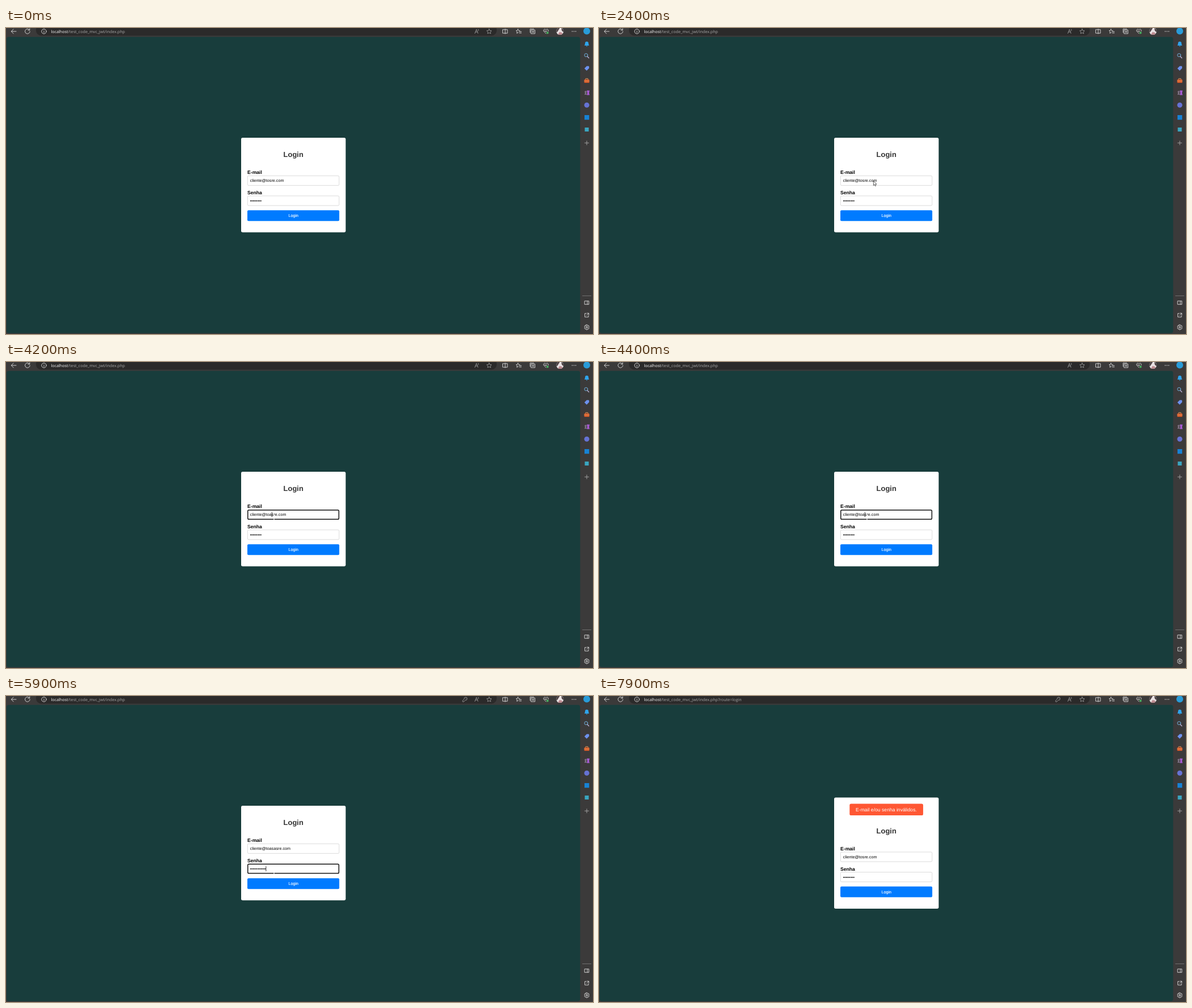
Animation, 1036 px wide and 541 px high, one loop 8000 ms. Source, as an HTML page:

```html
<!DOCTYPE html>
<html lang="pt-BR">
<head>
<meta charset="utf-8">
<title>Login</title>
<style>
  html, body { margin: 0; width: 100%; height: 100%; overflow: hidden; background: #3b3a3a; }
  svg { display: block; width: 100%; height: 100%; }
  text { text-rendering: geometricPrecision; white-space: pre; }
  .ui { font-family: "Open Sans", "Noto Sans", sans-serif; }
  .form { font-family: "Liberation Sans", Arial, sans-serif; font-size: 7.2px; }
  .label { font-size: 8.63px; font-weight: bold; }
  .line { fill: none; stroke: #dedede; stroke-width: .9; stroke-linecap: round; stroke-linejoin: round; }
  .dim { stroke: #999; }
  .field { fill: #fff; }
</style>
</head>
<body>
<svg viewBox="0 0 1036 541" preserveAspectRatio="none">
  <defs>
    <filter id="shadow" x="-10%" y="-10%" width="120%" height="120%">
      <feDropShadow dx="0" dy="0" stdDeviation="2" flood-opacity=".08"/>
    </filter>
    <clipPath id="face"><circle cx="977.7" cy="5.6" r="6.5"/></clipPath>
  </defs>
  <rect width="1036" height="541" fill="#3b3a3a"/>
  <rect x="1" y="15.8" width="1012.3" height="523.7" rx="4" fill="#183d3c"/>

  <!-- address bar -->
  <rect x="53" y="-6" width="813" height="19.5" rx="9" fill="#2b2a2a"/>
  <g class="line">
    <path d="M18 6H9.5M13.2 2L9.3 6L13.2 10"/>
    <path d="M41.4 3.4A4.3 4.3 0 1 0 42.2 6M41.8 1V3.9H38.9"/>
    <circle cx="67" cy="6" r="4.2"/><path d="M67 5.6V8.2M67 3.8V3.9"/>
  </g>
  <text class="ui" x="79.4" y="8.7" font-size="7.18" fill="#fff">localhost<tspan id="path" fill="#a9a9a9"></tspan></text>
  <g class="line dim">
    <path id="key" d="M806 9.8V8L808.7 5.3A2.6 2.6 0 1 1 810.6 7.3L808.4 9.8ZM811.3 4.3V4.4"/>
    <path d="M827.5 9.5L830.3 2.4L833 9.5M828.5 7H832M833.5 2.2Q835 3.5 833.5 5"/>
    <path d="M852.7 1.7L854 4.5L857 4.9L854.8 7L855.4 10L852.7 8.5L850 10L850.6 7L848.4 4.9L851.4 4.5Z"/>
  </g>
  <g class="line">
    <path d="M877 2.8H885V9.2H877ZM881 1.8V10.2"/>
    <path d="M903.5 2L904.6 4.4L907 4.8M903.5 2L902.4 4.4L900.4 4.7L902 6.5L901.6 9.3L904 8M905.5 6.4H909.5M906 8.8H909.5"/>
    <path d="M927 3.5H933.5V10H927ZM925 8V1.8H931.5M930.2 5V8.5M928.5 6.7H932"/>
    <path d="M953 9.8L949.2 6C947.5 3.2 951 .5 953 3.4C955 .5 958.5 3.2 956.8 6M950.5 5.3H952L953 7L954 4.8"/>
    <path d="M999.3 6H999.4M1002.4 6H1002.5M1005.5 6H1005.6" stroke-width="1.5"/>
  </g>
  <circle cx="955.7" cy="8.6" r="2" fill="#4aaf61"/>
  <g clip-path="url(#face)">
    <rect x="971" y="-1" width="14" height="14" fill="#e9e2e3"/>
    <path d="M971 -1H978L973 7L971 8ZM980 0L985 3V8L981 5Z" fill="#4d4345"/>
    <path d="M973 13L977 7L981 8L984 13Z" fill="#bd8c91"/>
  </g>
  <circle cx="1025" cy="5.5" r="6" fill="#299bd8"/>

  <!-- sidebar -->
  <path d="M1020.8 31Q1022 29.5 1022 27A3 3 0 0 1 1028 27Q1028 29.5 1029.2 31ZM1023.5 31.6H1026.5L1025 33Z" fill="#2fa4ec"/>
  <g class="line"><circle cx="1023.8" cy="48" r="2.9" style="stroke:#75bdec"/><path d="M1026 50.3L1028.6 53" style="stroke:#b9b0d5;stroke-width:1.4"/></g>
  <path d="M1020.8 71.5L1025 67.2L1029 67.5L1029.2 71L1024.8 75.5Z" fill="#6d91ee"/>
  <path d="M1020.6 91H1029.4V97H1020.6Z" fill="#d45a2b"/>
  <path d="M1023 91V89.4H1027V91M1020.6 93.8H1029.4" class="line" style="stroke:#f19a58"/>
  <path d="M1021 118H1025L1024 114.5A1.8 1.8 0 1 0 1022 114.5Z" fill="#7c7083"/>
  <path d="M1025 118.5H1030L1029 115L1030 110.5H1025L1026 115Z" fill="#a85bd4"/>
  <circle cx="1025" cy="136.2" r="4.5" fill="#6672d4"/>
  <rect x="1021" y="154" width="8.2" height="8.2" fill="#1782d4"/>
  <rect x="1021.5" y="176" width="7" height="7" fill="#3aa5c0"/>
  <g class="line">
    <path d="M1021.5 203.2H1028.5M1025 199.7V206.7" style="stroke:#aaa"/>
    <path d="M1017.5 473.5H1032.5" style="stroke:#777"/>
    <path d="M1021.5 482.7H1028.7V488.7H1021.5ZM1026 482.7V488.7"/>
    <path d="M1024 504.6H1021.6V511H1028V508.5M1025.6 504.2H1028.6V507.2M1028.3 504.5L1024.8 508"/>
    <circle cx="1025" cy="529" r="1.4"/>
    <path d="M1024 524.8H1026L1026.5 526.3L1028 525.8L1029.2 527.7L1028.2 529L1029.2 530.4L1028 532.2L1026.5 531.8L1026 533.3H1024L1023.5 531.8L1022 532.2L1020.8 530.4L1021.8 529L1020.8 527.7L1022 525.8L1023.5 526.3Z"/>
  </g>

  <!-- login card -->
  <rect id="card" x="415" width="184.5" rx="2.7" fill="#fff" filter="url(#shadow)"/>
  <g id="alert" class="form">
    <rect x="442.3" y="190.4" width="129.8" height="20.7" rx="2.7" fill="#ff5733"/>
    <text x="453" y="203.6" font-size="8.63" style="font-size:8.63px" fill="#fff">E-mail e/ou senha inválidos.</text>
  </g>
  <g id="form" class="form">
    <text x="507.2" y="228" text-anchor="middle" style="font-size:12.95px;font-weight:bold" fill="#333">Login</text>
    <text class="label" x="426" y="258.4">E-mail</text>
    <rect id="emailBox" class="field" rx="1.8"/>
    <text id="email" x="430.8" y="272.2"></text>
    <text class="label" x="426" y="294.2">Senha</text>
    <rect id="passBox" class="field" rx="1.8"/>
    <text id="pass" x="430.8" y="308"></text>
    <rect id="button" x="426" y="322.2" width="162.2" height="19" rx="2"/>
    <text x="507.2" y="334.3" text-anchor="middle" fill="#fff" stroke="#fff" stroke-width=".15">Login</text>
    <rect id="caret" width=".8" height="9"/>
  </g>

  <!-- autofill list -->
  <g id="list" class="ui" fill="#fff">
    <rect x="425.7" y="278.8" width="173.8" height="86" rx="4" fill="#4a4a4a" stroke="#646464" stroke-width=".6"/>
    <text x="432.7" y="291" font-size="5.6" fill="#b4b4b4">Digite '/' para pesquisar a partir das suas informações salvas</text>
    <g font-size="6.2" font-weight="700">
      <text x="433" y="310.6">cliente@tosre.com</text>
      <text x="433" y="331">cliente@tosre.com.br</text>
    </g>
    <path d="M426 341.5H599.3" stroke="#6c6c6c" stroke-width=".8"/>
    <g class="line"><circle cx="436" cy="351.3" r="1.9"/><path d="M436.5 357H433.2Q433 354.6 436 354.5"/></g>
    <rect x="436.8" y="353.8" width="3.8" height="3.4" rx=".5"/>
    <text x="447" y="356" font-size="6.07">Gerenciar informações pessoais</text>
  </g>

  <!-- pointers, hot spot at 0,0 -->
  <g id="pointer" stroke="#222" stroke-width=".7" stroke-linejoin="round" fill="#fff">
    <path id="arrow" d="M.4 .4V8.3L2.2 6.7L3.5 9.5L4.8 8.9L3.6 6.2H6Z"/>
    <path id="hand" d="M-.9 .7Q0 -.6 .9 .7V4L3.8 4.7Q5 5.1 4.8 6.5L4 10.8H-.5L-3 7.2Q-3.2 5.8 -.9 7Z"/>
    <path id="beam" d="M0 0V10" stroke="#fff" stroke-width="1.2"/>
  </g>
</svg>
<script>
const LOOP = 8000, STEP = 100;
const $ = id => document.getElementById(id);
const set = (id, attrs) => { for (const k in attrs) $(id).setAttribute(k, attrs[k]); };
const show = (id, on) => set(id, { visibility: on ? 'visible' : 'hidden' });
const passed = (t, times) => times.filter(x => x <= t).length;
const ramp = (t, a, b) => Math.min(1, Math.max(0, (t - a) / (b - a)));

// time, shape, x, y; glides while the shape stays the same
const track = [
  [0], [200, 'arrow', 75, 159], [400, 'arrow', 216, 241], [500, 'arrow', 216, 241], [1300, 'arrow', 514, 346],
  [1400], [1800, 'arrow', 558, 290], [1900, 'arrow', 478, 296],
  [2100], [2300, 'arrow', 484, 282], [2400, 'arrow', 484, 270],
  [2500], [3500, 'arrow', 487, 285], [3800, 'arrow', 487, 281],
  [3900], [4100, 'beam', 473, 269.5], [5000, 'arrow', 470, 282], [5100, 'arrow', 451, 296],
  [5200], [5500, 'beam', 473, 305], [6100, 'hand', 480, 331.5],
  [7100, 'arrow', 484, 318], [7500, 'arrow', 571, 135], [7800, 'arrow', 470, 290], [7900]
];
const emailKeys = [4100, 4700, 4900], passKeys = [5600, 5700, 5900];
const caretResets = [2800, ...emailKeys, 5500, ...passKeys];

function drawPointer(t) {
  const i = track.findLastIndex(k => k[0] <= t);
  const [start, shape, x, y] = track[i], next = track[i + 1];
  for (const id of ['arrow', 'hand', 'beam']) show(id, id === shape);
  if (!shape) return;
  const glide = next && next[1] === shape;
  const f = glide ? ramp(t, start, next[0]) : 0;
  const px = glide ? x + (next[2] - x) * f : x;
  const py = glide ? y + (next[3] - y) * f : y;
  set('pointer', { transform: `translate(${px} ${py})` });
}

// The border lies inside the field's outer edge
function drawField(id, top, focused) {
  const border = focused ? 1.5 : .7;
  set(id, {
    x: 426 + border / 2, y: top + border / 2, width: 162.2 - border, height: 17.8 - border,
    stroke: focused ? '#101010' : '#ccc', 'stroke-width': border
  });
}

function drawCaret(t, inEmail, inPass, typed) {
  const last = caretResets.findLast(x => x <= t);
  show('caret', (inEmail || inPass) && t >= caretResets[0] && Math.floor((t - last) / 530) % 2 === 0);
  const id = inPass ? 'pass' : 'email';
  const chars = inPass ? $(id).textContent.length : 10 + typed;
  set('caret', { x: 430.8 + $(id).getSubStringLength(0, chars), y: inPass ? 301 : 265.3 });
}

function draw(t) {
  const failed = t >= 6400;
  const typed = failed ? 0 : passed(t, emailKeys);
  const inEmail = t >= 2700 && t < 5500, inPass = t >= 5500 && t < 6100;

  $('path').textContent = '/test_code_mvc_jwt/index.php' + (failed ? '?route=login' : '');
  show('key', t >= 5500);
  show('alert', failed);
  set('card', failed ? { y: 179.5, height: 196.5 } : { y: 194, height: 167.2 });
  set('form', { transform: `translate(0 ${failed ? 14.6 : 0})` });

  $('email').textContent = 'cliente@to' + 'asa'.slice(0, typed) + 'sre.com';
  $('pass').textContent = '•'.repeat(8 + (failed ? 0 : passed(t, passKeys)));
  drawField('emailBox', 260.9, inEmail);
  drawField('passBox', 296.5, inPass);
  drawCaret(t, inEmail, inPass, typed);

  const hover = failed ? 0 : t < 2000 ? ramp(t, 1000, 1300) - ramp(t, 1400, 1600) : ramp(t, 6000, 6200);
  set('button', { fill: `rgb(0 ${Math.round(123 - 37 * hover)} ${Math.round(255 - 76 * hover)})` });
  set('list', { opacity: ramp(t, 2700, 3000) - ramp(t, 4000, 4200) });
  drawPointer(t);
}

function frame(now) {
  draw(Math.floor(now % LOOP / STEP) * STEP);
  requestAnimationFrame(frame);
}
requestAnimationFrame(frame);
</script>
</body>
</html>
```
